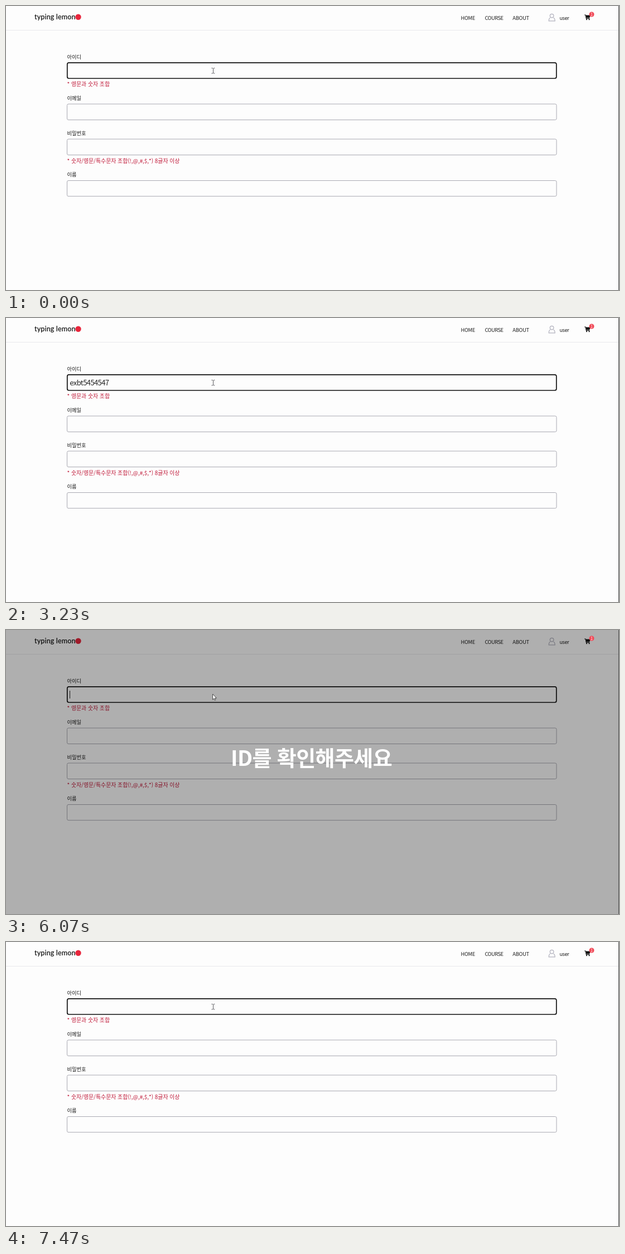
These frames come from a looping animation (1099 px wide and 510 px high, 8000 ms). An HTML page:

```html
<!DOCTYPE html>
<html lang="ko">
<head>
<meta charset="utf-8">
<title>회원가입</title>
<style>
  html, body { margin: 0; width: 100%; height: 100%; overflow: hidden; background: #fdfdfd; }
  svg { display: block; width: 1099px; height: 510px; }
  text { font-family: "Noto Sans CJK KR", "Noto Sans CJK", "Noto Sans", sans-serif; white-space: pre; }
  .brand { font: 600 12.5px Lato, "Open Sans", sans-serif; letter-spacing: .12px; fill: #161616; }
  .nav { font-size: 9.2px; letter-spacing: -.2px; fill: #1c1c1c; }
  .label { font-size: 9.2px; font-weight: 500; fill: #161616; }
  .hint { font-size: 9.9px; font-weight: 300; fill: #bf1636; }
  .typed { font-size: 13px; font-weight: 300; letter-spacing: -.6px; fill: #222; }
  .notice { font-size: 38px; font-weight: 700; letter-spacing: -.6px; fill: #fff; }
  .badge { font-size: 7px; fill: #fff; text-anchor: middle; }
  .field { fill: none; stroke: #a9a9b2; }
  .focus { fill: none; stroke: #111; stroke-width: 1.7; }
</style>
</head>
<body>
<svg viewBox="0 0 1099 510">
  <rect width="1099" height="510" fill="#fdfdfd"/>

  <!-- header -->
  <path d="M0 43.5H1098" stroke="#e9e9ec"/>
  <text class="brand" x="51" y="23.5">typing lemon</text>
  <circle cx="129.5" cy="19.8" r="5.2" fill="#e8263c"/>
  <text class="nav" x="815.5" y="25">HOME</text>
  <text class="nav" x="858.5" y="25" style="letter-spacing:-.45px">COURSE</text>
  <text class="nav" x="908.3" y="25">ABOUT</text>
  <g fill="none" stroke="#b1b1bd" stroke-width="1.2">
    <circle cx="978.6" cy="17.6" r="3.3"/>
    <path d="M975.6 21Q973.3 22.3 973.2 26.8H984.2Q984 22.3 981.6 21"/>
  </g>
  <text class="nav" x="992.5" y="24.7" style="letter-spacing:-.5px">user</text>
  <path d="M1037 16H1039L1040.3 22.4H1046.3" fill="none" stroke="#111" stroke-width="1.2"/>
  <path d="M1039.2 16.6H1047.6L1046.4 21.3H1040.2Z" fill="#111"/>
  <circle cx="1041" cy="24.2" r="1.1" fill="#111"/>
  <circle cx="1045.6" cy="24.2" r="1.1" fill="#111"/>

  <!-- form -->
  <text class="label" x="109.6" y="94.5">아이디</text>
  <rect class="focus" x="109.8" y="101.8" width="877" height="28.2" rx="3"/>
  <text class="hint" x="109.5" y="144.3">* 영문과 숫자 조합</text>
  <text class="label" x="109.6" y="168.7">이메일</text>
  <rect class="field" x="109.5" y="176" width="877.5" height="28.5" rx="2.5"/>
  <text class="label" x="109.6" y="232">비밀번호</text>
  <rect class="field" x="109.5" y="239" width="877.5" height="28.5" rx="2.5"/>
  <text class="hint" x="109.5" y="281.6">* 숫자/영문/특수문자 조합(!,@,#,$,*) 8글자 이상</text>
  <text class="label" x="109.6" y="306.3">이름</text>
  <rect class="field" x="109.5" y="313.5" width="877.5" height="28.2" rx="2.5"/>
  <text class="typed" id="typed" x="114.3" y="121"></text>
  <path id="caret" d="M114.5 109V123" stroke="#222"/>

  <g id="modal">
    <rect width="1099" height="510" fill="#000" fill-opacity=".31"/>
    <text class="notice" x="403" y="244">ID를 확인해주세요</text>
  </g>

  <circle cx="1050" cy="15" r="4.5" fill="#f04a58"/>
  <text class="badge" x="1050" y="17.6">1</text>
  <path d="M1098.5 0V510" stroke="#4c4c4c"/>

  <path id="beam" d="M368.5 111.5H370.3L371.5 112.5L372.7 111.5H374.3M371.5 112V120.5M368.5 121H370.3L371.5 120L372.7 121H374.3" fill="none" stroke="#4a4a50" stroke-width=".9"/>
  <path id="arrow" d="M370.6 115V125L372.8 122.9L374.2 126.2L375.8 125.5L374.4 122.3H377.4Z" fill="#fff" stroke="#222" stroke-width=".8"/>
</svg>

<script>
const LOOP = 8000;
const ID = "exbt5454547";
// [time, number of characters in the field]
const TYPING = [[0, 0], [2000, 2], [2030, 4], [2070, 5], [2430, 6], [2470, 7],
  [2630, 8], [2670, 9], [2700, 10], [2730, 11], [3430, 10], [6070, 0]];
const BLINKS = [870, 1400, 2000, 3200, 3630, 4070, 4570, 5030, 5300, 6000,
  6070, 6430, 7000, 7470];

const el = id => document.getElementById(id);
const [typed, caret, modal, beam, arrow] =
  ["typed", "caret", "modal", "beam", "arrow"].map(el);
const show = (node, on) => node.style.display = on ? "" : "none";
const within = (t, from, to) => t >= from && t < to;

function draw(t) {
  const text = ID.slice(0, TYPING.findLast(step => step[0] <= t)[1]);
  if (typed.textContent !== text) typed.textContent = text;

  const x = text ? Math.round(typed.getComputedTextLength()) : 0;
  caret.setAttribute("transform", `translate(${x} 0)`);
  show(caret, BLINKS.filter(b => b <= t).length % 2);

  show(modal, within(t, 6070, 7370));
  show(arrow, within(t, 6070, 6100));
  show(beam, !within(t, 5670, 6100));
}

const start = performance.now();
function tick() {
  draw((performance.now() - start) % LOOP);
  requestAnimationFrame(tick);
}
tick();
</script>
</body>
</html>
```
